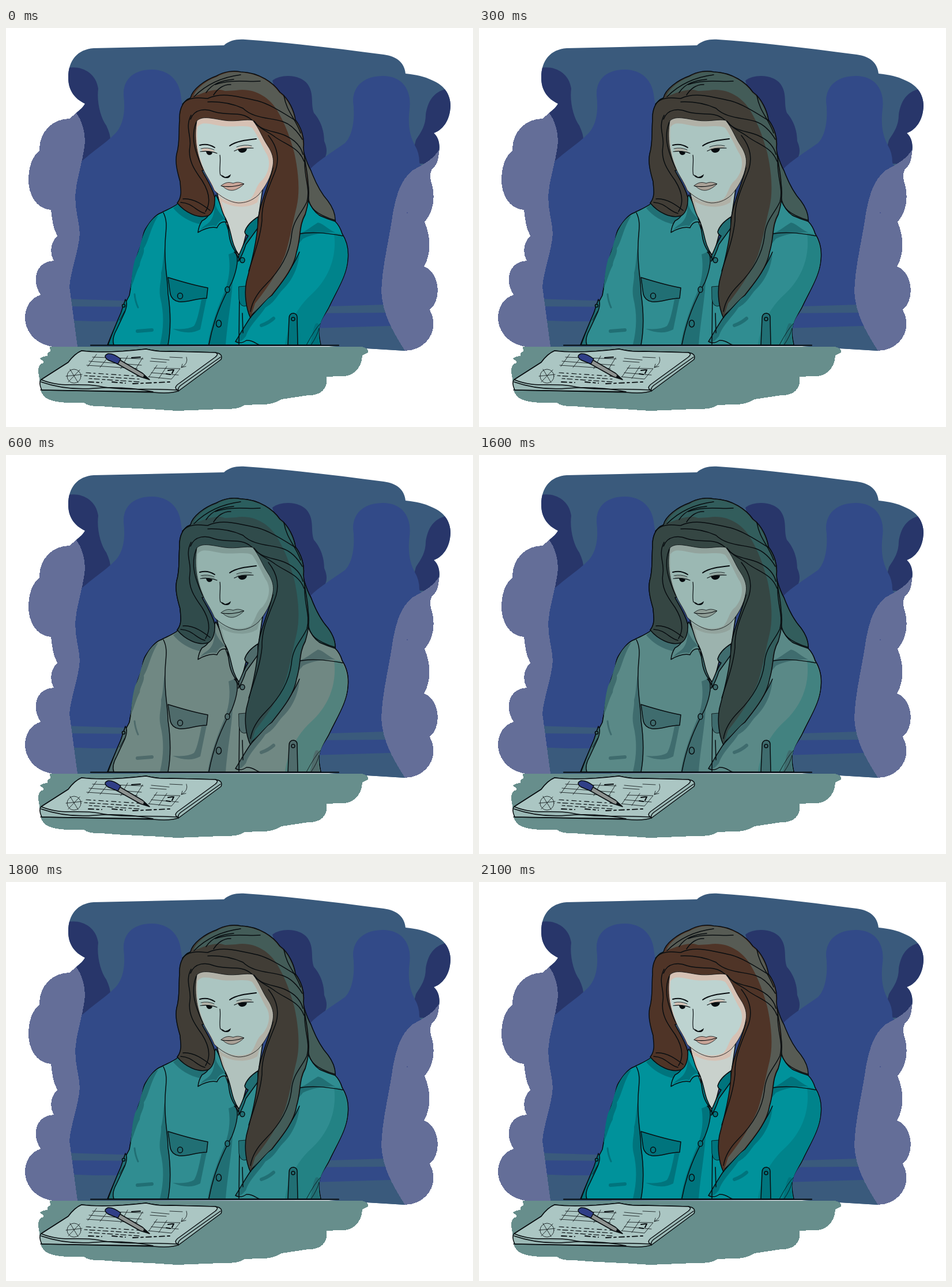
Write an HTML page that moves like this. It is 810 px wide and 691 px high and loops after 2.2 s.

```html
<!DOCTYPE html>
<html lang="en">
<head>
<meta charset="utf-8">
<title>Fading into the crowd</title>
<style>
html, body { margin: 0; width: 100%; height: 100%; overflow: hidden; background: #fff; }
svg { display: block; width: 810px; height: 691px; }
.warm {
  --shirt: #00929b; --fold: #00747d; --arm: #00838b;
  --hair: #4f3427; --sheen: #575b54;
  --face: #bdd3d0; --blush: #d6c1b4; --neck: #c9d1cc; --lip: #c9a598;
}
.cool {
  --shirt: #708883; --fold: #4f6b6b; --arm: #52827d;
  --hair: #304b4b; --sheen: #2b5e5e;
  --face: #94b2ad; --blush: #829c97; --neck: #91ada8; --lip: #819d97;
  animation: fade 2200ms linear infinite;
}
@keyframes fade {
  0% { opacity: 0; animation-timing-function: step-end; }
  4.545% { opacity: .05; animation-timing-function: steps(5, jump-end); }
  27.272% { opacity: 1; }
  72.727% { opacity: 1; animation-timing-function: steps(5, jump-start); }
  95.453% { opacity: .05; }
  95.454%, 100% { opacity: 0; }
}
.shirt { fill: var(--shirt); }
.fold { fill: var(--fold); }
.arm { fill: var(--arm); }
.hair { fill: var(--hair); }
.sheen { fill: var(--sheen); }
.face { fill: var(--face); }
.blush { fill: var(--blush); }
.neck { fill: var(--neck); }
.lip { fill: var(--lip); }
.ink { stroke: #080d10; stroke-width: 1.5; stroke-linecap: round; stroke-linejoin: round; }
.line { fill: none; }
.thin { stroke-width: .8; }
.smudge { fill: none; stroke: var(--fold); stroke-width: 6; stroke-linecap: round; }
.flat { shape-rendering: crispEdges; }
</style>
</head>
<body>
<svg viewBox="0 0 810 691">
<defs>
  <clipPath id="room" class="flat">
    <path d="M152 35L378 30C388 21 400 19 415 20C500 26 580 36 655 46C678 49 691 60 693 79C712 81 726 84 738 90C761 99 771 116 771 135C770 160 758 176 742 182C751 190 753 203 751 214L735 246L715 330V500L692 559L626 555L560 551L100 552V300L122 147C128 142 134 137 137 131C118 122 108 107 108 86C108 56 124 37 152 35Z"/>
  </clipPath>

  <g id="woman">
    <!-- hair behind the shoulder -->
    <path class="sheen ink" d="M505 190C517 205 516 225 529 247C538 271 549 289 558 299C567 311 572 323 571 336L546 328L515 310Z"/>

    <!-- shirt -->
    <path class="shirt ink" d="M300 303C288 312 278 315 269 320C257 324 248 338 242 348C237 356 237 366 235 374C226 394 221 417 218 440L214 463C208 475 204 480 201 490C193 510 184 527 176 549L546 549C543 535 541 523 545 511C548 501 556 493 561 482C574 454 591 429 593 401C595 383 590 367 583 356C580 346 576 340 571 335C560 331 550 328 543 324C534 318 528 308 523 296L437 328L403 398L371 290L340 330Z"/>
    <path class="arm" d="M569 355C575 400 557 438 527 464C508 482 489 511 484 548L545 548C540 527 544 513 549 503L561 480C576 450 592 425 592 399C593 380 588 365 579 356Z"/>
    <path class="fold" d="M242 350C234 364 233 384 224 400C219 417 218 434 216 452C224 433 225 424 232 411C232 402 241 391 239 382C248 368 249 350 264 325C254 329 247 339 242 350Z"/>
    <path class="fold" d="M276 376C277 410 278 432 283 468C286 500 285 525 281 548L267 548C274 520 274 494 268 469C264 450 270 438 269 424C273 411 272 394 276 376Z"/>
    <path class="fold" d="M300 303C312 320 337 331 355 325L341 334L338 340C318 336 302 326 290 312Z"/>
    <path class="fold" d="M386 392L396 388C408 396 397 418 393 440C391 475 384 510 381 548L350 548C354 521 365 490 375 466C387 440 390 416 386 392Z"/>
    <path class="fold" d="M509 388C501 400 503 412 490 420C490 431 477 435 475 444C463 451 463 462 452 468C444 483 428 493 423 503L399 543C406 545 411 540 416 534C422 515 440 500 450 484C467 475 472 460 482 451C496 437 508 414 509 388Z"/>
    <path class="fold" d="M508 356C522 352 530 343 541 337C551 339 559 349 571 354C551 354 530 357 515 365L506 376Z"/>
    <path class="fold" d="M537 512C546 508 543 524 541 533L544 548L527 548C532 535 531 523 537 512Z"/>
    <path class="fold" d="M339 470L348 468L337 522Q317 533 289 521Q316 523 326 516Q332 508 339 470Z"/>

    <path class="smudge" d="M228 525L253 523M443 515Q455 511 464 503"/>
    <path class="smudge" style="stroke-width:3" d="M223 461Q224 473 229 484"/>

    <path class="ink line" d="M273 320C282 337 276 354 276 376C274 410 281 436 281 460C286 493 286 522 281 549"/>
    <path class="ink line" d="M500 359C524 351 556 355 584 360M509 388C494 422 474 446 453 469L424 501C412 519 408 527 398 543Q407 548 417 541C429 540 434 548 440 549"/>
    <path class="ink line" d="M396 388C406 394 400 420 392 440C374 473 360 505 352 548M405 450L404 548M410 494L411 528"/>
    <path class="ink fold" d="M281 432C307 440 327 446 350 450L348 468C328 468 315 476 300 474Q288 472 285 461Z"/>
    <path class="ink fold thin" d="M404 448L416 447L418 481Q406 485 404 470Z"/>
    <path class="ink fold" d="M491 503Q491 494 499 494Q506 495 505 504L506 549L489 549Z"/>
    <path class="ink fold" d="M207 470Q212 476 206 492L192 522Q183 538 187 549L177 549Q185 526 199 494Z"/>
    <path class="ink line thin" d="M521 549Q536 521 545 512M529 549Q540 533 543 520M206 490L197 506"/>
    <g class="ink fold">
      <ellipse cx="302" cy="464" rx="4.5" ry="5"/>
      <ellipse cx="384" cy="453" rx="4" ry="5"/>
      <ellipse cx="369" cy="512" rx="4.5" ry="6"/>
      <ellipse cx="410" cy="402" rx="4" ry="4.5"/>
      <circle cx="498" cy="504" r="3"/>
      <circle cx="204" cy="481" r="2.5"/>
    </g>

    <!-- neck and collar -->
    <path class="neck ink" d="M365 283C373 304 371 318 379 332C389 353 390 374 403 397C409 389 412 374 416 359C420 345 430 334 438 327L445 280Z"/>
    <path class="blush" d="M368 290C385 304 405 309 440 286L436 302C415 315 387 309 374 300L380 324L376 323Z"/>
    <path class="shirt ink" d="M364 289C374 305 372 316 381 330L384 337C375 333 369 339 366 346Q352 343 333 354Q334 343 340 334C353 328 359 312 360 297Z"/>
    <path class="fold" d="M362 302C366 318 375 324 380 331C372 332 368 336 365 343Q353 340 337 350Q341 344 348 340C360 332 362 318 362 302Z"/>
    <path class="fold ink" d="M380 331L384 337C387 354 386 370 397 386C404 390 405 397 403 404Q410 394 416 375L437 346V327C426 334 417 343 414 353Q415 358 420 360C413 370 409 383 404 393C390 374 392 354 383 335Z"/>

    <!-- hair -->
    <path class="hair ink" d="M365 83C379 75 395 73 407 76C440 77 464 95 475 111C491 122 500 145 502 159C512 172 518 190 516 207C517 229 523 247 524 269C527 290 524 306 519 323C508 342 512 362 504 388C500 415 479 440 461 463C447 473 432 486 424 502C416 485 413 459 417 439C425 408 435 371 437 337C438 309 454 278 463 242L400 220L340 247C346 259 358 276 362 293C363 305 360 320 351 325C333 331 310 319 297 303C307 291 302 275 302 266C297 249 293 233 296 218C302 199 299 180 301 160C300 142 306 126 320 121C323 106 345 90 365 83Z"/>
    <path class="sheen" d="M365 85C380 76 395 75 407 77C440 79 463 96 474 112C490 124 499 145 501 160C511 173 516 190 515 207C516 230 522 247 522 269C526 290 523 306 518 322C506 342 511 362 503 387C499 414 478 439 460 462L426 496L432 477C449 456 471 425 484 393C492 368 496 342 504 310C511 280 506 243 500 216C493 191 486 169 470 142C456 119 429 103 399 108L380 109C366 103 344 111 325 119C328 107 345 92 365 85Z"/>
    <g class="ink line">
      <path d="M326 119C342 103 367 86 407 81M347 112C358 95 375 91 395 89M363 98C390 88 420 94 441 92M360 116C367 105 378 97 390 98"/>
      <path d="M306 132C317 118 335 121 350 122C376 109 410 121 436 126C458 132 479 146 502 160"/>
      <path d="M350 128C373 127 395 132 411 139C429 157 458 155 480 162C497 168 507 181 514 193"/>
      <path d="M320 158C327 139 348 139 361 145C388 153 408 143 426 159C444 181 466 177 486 187C503 195 512 207 515 219"/>
      <path d="M430 161C442 177 455 179 467 189C487 203 508 207 517 231"/>
      <path d="M321 151C310 172 322 187 319 205C315 229 327 246 340 264C352 283 356 302 346 318"/>
      <path d="M330 163C319 190 329 217 341 243M307 296C326 294 345 309 354 316M303 302C324 303 330 318 345 321"/>
      <path d="M455 186C472 207 475 230 465 253C452 285 443 306 444 333C441 365 429 395 421 421"/>
      <path d="M518 229C517 259 528 277 522 301C511 324 497 333 495 362C491 393 474 421 450 445C436 459 427 473 424 491"/>
      <path d="M482 117C487 146 502 156 511 182M524 292C526 312 538 323 571 333"/>
    </g>

    <!-- face -->
    <path class="blush ink thin" d="M331 161C340 151 358 157 379 160C399 163 417 157 428 160C440 175 444 189 454 204C462 216 465 227 463 238C460 258 450 275 438 289C426 300 414 303 403 303C388 302 372 292 361 281C355 266 346 254 342 244C330 218 326 189 331 161Z"/>
    <path class="face" d="M332 172C340 160 354 167 375 170C400 172 416 167 427 173C437 187 443 202 450 215C461 230 456 250 445 263C433 272 434 285 424 296C405 305 382 301 363 281C355 262 346 254 343 243C334 221 330 201 332 172Z"/>
    <path class="blush" d="M340 209Q352 206 364 215Q351 211 340 214ZM398 210Q411 201 428 206Q415 207 402 211Z"/>
    <path class="lip ink thin" d="M373 273C382 266 388 267 394 269C401 266 406 267 413 270C407 276 400 280 394 281C386 282 380 278 377 275Z"/>
    <g class="ink line" style="stroke-width:1.2">
      <path d="M336 203Q350 199 362 207M388 204C399 196 416 194 434 192" style="stroke-width:2"/>
      <path d="M337 214Q353 212 366 217M396 213C407 207 417 208 429 208"/>
      <path class="thin" d="M400 206Q413 201 426 204M338 209Q350 206 361 211"/>
      <path d="M371 220C373 232 369 246 372 255M375 274C390 276 401 274 412 270"/>
    </g>
    <path fill="#080d10" d="M347 214Q353 212 358 216Q357 220 352 220Q348 219 347 214ZM402 210Q410 207 418 209Q417 215 410 216Q404 216 402 210ZM372 254Q376 255 380 258Q386 257 390 253Q389 260 383 260Q375 260 372 254Z"/>
  </g>
</defs>

<rect width="810" height="691" fill="#fff"/>

<!-- crowd -->
<g clip-path="url(#room)">
  <rect width="810" height="691" fill="#3a5a7c"/>
  <path fill="#28366a" d="M100 71C126 62 156 75 160 105C157 128 164 155 174 169Q181 184 181 193L130 235L100 180ZM462 91C477 79 510 80 523 97C535 114 528 130 534 147C549 164 552 184 552 196Q559 212 554 223L510 260ZM775 104C744 106 732 124 728 150C728 169 720 180 711 194L700 235H780Z"/>
  <path fill="#324a88" d="M204 116C203 87 224 72 252 72C281 72 302 89 304 123L330 260H515L527 245C542 229 566 215 587 200C601 188 606 157 602 127C602 98 624 83 654 83C687 83 704 107 700 140C696 172 702 189 709 203Q717 216 717 233L750 300V516L530 521L400 508H100V260C141 219 158 211 184 188C205 171 207 144 204 116Z"/>
  <path fill="#3a5a7c" d="M100 469L230 473V483L100 482ZM530 483L660 479V493L530 494ZM100 506L230 511V560H100ZM530 520L700 515V570H530Z"/>
</g>
<g class="flat" fill="#646e98">
  <path d="M122 147C132 161 137 179 137 197C135 226 122 260 120 291C120 316 127 336 128 356C126 386 112 421 110 448L124 552H82C56 549 34 530 33 503C33 482 43 468 60 462C45 440 49 405 83 403C75 390 77 371 89 360C81 346 80 330 78 315C51 313 39 287 39 263C39 239 46 222 58 212C57 181 80 157 110 157Z"/>
  <path d="M751 211C751 227 748 237 738 246C735 253 736 258 737 265C744 285 745 315 726 336C738 364 737 393 725 413C752 423 757 470 735 488C753 520 732 558 692 559C670 524 654 497 651 457C652 413 665 365 671 321C677 290 684 263 706 246C722 237 740 229 751 211Z"/>
</g>
<circle cx="696" cy="320" r="1" fill="#46538c"/>

<!-- woman -->
<use href="#woman" class="warm"/>
<use href="#woman" class="cool"/>

<!-- table -->
<path class="flat" fill="#678e8c" d="M76 552H617Q630 555 628 562Q621 566 618 567C617 591 600 605 579 603L556 604C559 624 546 637 524 636L478 643Q462 653 440 652L414 653C402 662 384 659 371 660L296 663C250 659 205 659 164 655Q145 656 135 649C104 649 69 651 61 630L57 601Q53 590 61 581Q71 580 59 573Q61 569 72 568Q70 562 77 560Z"/>
<path class="ink line" style="stroke-width:2.2" d="M147 549.5H577"/>

<!-- notepad -->
<path class="ink" fill="#9bb9b6" d="M131 559C155 562 190 562 243 556Q263 561 285 560L363 562Q377 564 373 574L300 628Q287 634 255 631L62 627Q56 614 61 609L108 579Q119 564 131 559Z"/>
<path class="ink" fill="#abc6c3" d="M131 559C155 562 190 562 243 556Q263 561 285 560L363 562Q370 564 363 570L301 615Q289 623 298 627C250 623 203 629 160 620C124 614 97 624 61 609L108 579Q119 564 131 559Z"/>
<path class="ink line" d="M372 570L303 619Q297 624 299 629M61 613Q104 628 154 624T255 630L60 627"/>
<g class="ink line thin">
  <path d="M150 570L238 573M144 577L235 584M140 584L228 590M157 565L142 586M180 566L163 588M211 568L199 590M237 571L224 592"/>
  <circle cx="118" cy="603" r="12"/>
  <path d="M104 603L132 600M111 591L125 614M128 592L108 613"/>
  <path d="M252 572L283 575M250 577L278 579M284 570L306 571M313 570Q317 581 304 588M306 582L304 588L312 586"/>
  <path d="M262 584L248 604M279 586L265 607M252 597L299 601M257 589L302 590L287 608L247 604"/>
</g>
<g class="ink line" style="stroke-width:1.2">
  <path d="M139 597L244 604" stroke-dasharray="8 5 3 6"/>
  <path d="M136 602L231 608M144 607L232 613" stroke-dasharray="5 4 9 5"/>
  <path d="M143 613L166 614M184 613L207 615M220 616L284 613" style="stroke-width:1.8" stroke-dasharray="9 5 4 5"/>
  <path d="M218 571L233 570M281 593L289 592M278 599L285 600M291 592L288 598" style="stroke-width:2"/>
</g>
<path class="ink" fill="#8d9290" d="M196 574L237 598L249 609L233 604L192 581Z"/>
<path class="ink" fill="#303f87" d="M177 564Q186 563 199 573L194 582L177 575Q167 568 177 564Z"/>
<path fill="#080d10" d="M239 601L250 609L238 605Z"/>
</svg>
</body>
</html>
```
